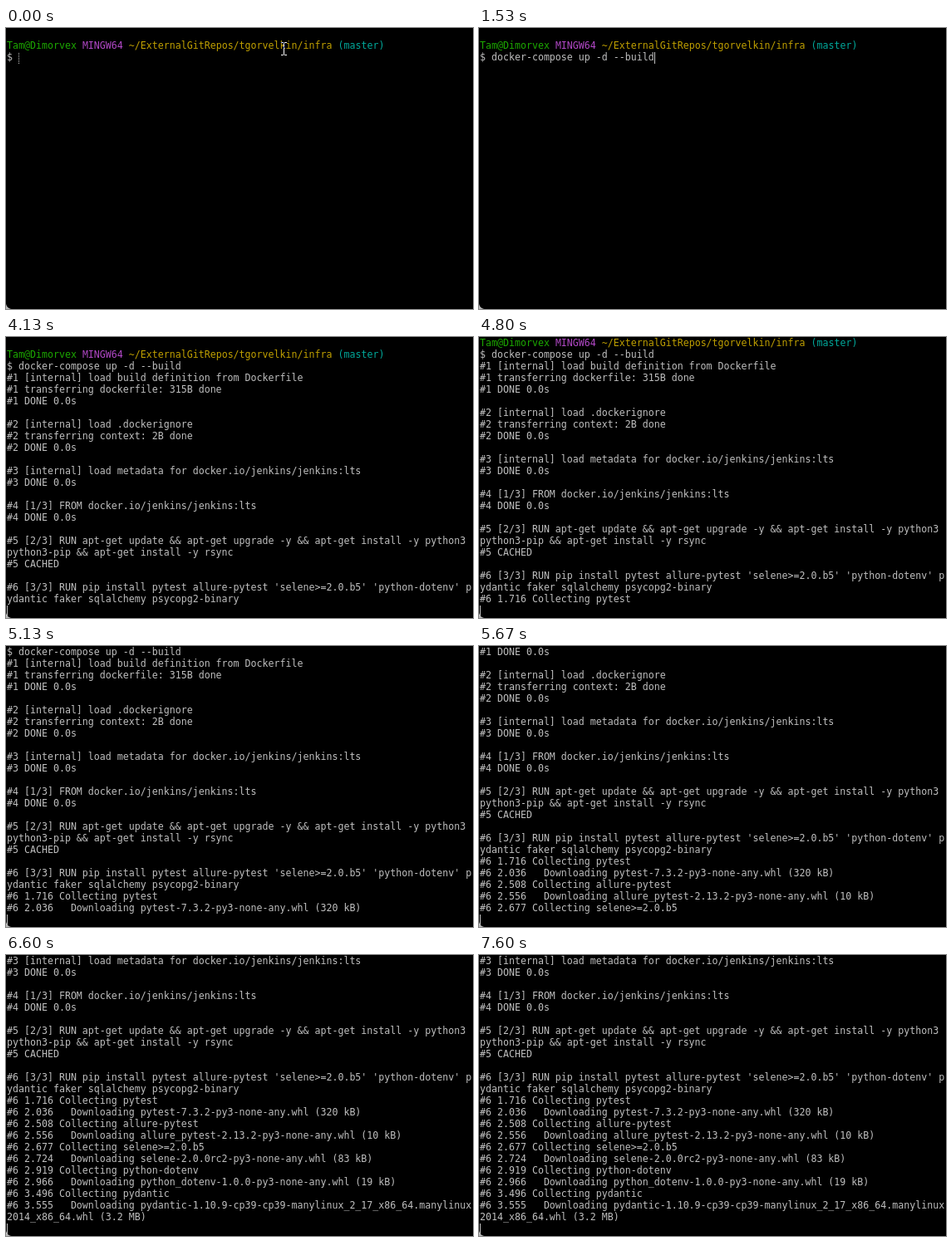
Recreate the animation shown at these times as an HTML page. Size 562 by 338 pixels, loop 8 s.

```html
<!DOCTYPE html>
<html lang="en">
<head>
<meta charset="utf-8">
<title>Terminal build</title>
<style>
  html, body { margin: 0; width: 100%; height: 100%; overflow: hidden; background: #000; }
  #stage { position: relative; width: 562px; height: 338px; overflow: hidden; background: #000; }
  #log {
    position: absolute; left: 1px; top: 0;
    color: #bfbfbf; font: 11.627px/14px "DejaVu Sans Mono", monospace;
    font-variant-ligatures: none; white-space: pre;
  }
  #log div { height: 14px; }
  .user { color: #1ca800; }
  .sys { color: #b148c6; }
  .path { color: #c0a000; }
  .branch { color: #00a89a; }
  #cursor { position: absolute; width: 1px; }
  #cursor.on { background: #bfbfbf; }
  #cursor.dots { background: repeating-linear-gradient(#000 0 1px, #bfbfbf 1px 2px); }
  #cursor.off { display: none; }
  #mouse { position: absolute; left: 331px; top: 17px; mix-blend-mode: difference; }
  #corner {
    position: absolute; left: 0; bottom: 0; width: 7px; height: 7px;
    background: radial-gradient(circle at 100% 0, transparent 6.5px, #b8b8b8 7.3px);
  }
</style>
</head>
<body>
<div id="stage">
  <div id="log"></div>
  <div id="cursor"></div>
  <svg id="mouse" width="7" height="16" shape-rendering="crispEdges">
    <path fill="#fff" d="M0 0h3v1h-3zM4 0h3v1h-3zM3 1h1v14h-1zM0 15h3v1h-3zM4 15h3v1h-3z"/>
  </svg>
  <div id="corner"></div>
</div>
<script>
const LOOP = 8000, COLS = 80, ROWS = 24, CELL_W = 7, CELL_H = 14;
const PROMPT = [
  ['user', 'Tam@Dimorvex'], ['sys', 'MINGW64'],
  ['path', '~/ExternalGitRepos/tgorvelkin/infra'], ['branch', '(master)'],
].map(([cls, text]) => `<span class="${cls}">${text}</span>`).join(' ');

const OUTPUT = `$ docker-compose up -d --build
#1 [internal] load build definition from Dockerfile
#1 transferring dockerfile: 315B done
#1 DONE 0.0s

#2 [internal] load .dockerignore
#2 transferring context: 2B done
#2 DONE 0.0s

#3 [internal] load metadata for docker.io/jenkins/jenkins:lts
#3 DONE 0.0s

#4 [1/3] FROM docker.io/jenkins/jenkins:lts
#4 DONE 0.0s

#5 [2/3] RUN apt-get update && apt-get upgrade -y && apt-get install -y python3 python3-pip && apt-get install -y rsync
#5 CACHED

#6 [3/3] RUN pip install pytest allure-pytest 'selene>=2.0.b5' 'python-dotenv' pydantic faker sqlalchemy psycopg2-binary
#6 1.716 Collecting pytest
#6 2.036   Downloading pytest-7.3.2-py3-none-any.whl (320 kB)
#6 2.508 Collecting allure-pytest
#6 2.556   Downloading allure_pytest-2.13.2-py3-none-any.whl (10 kB)
#6 2.677 Collecting selene>=2.0.b5
#6 2.724   Downloading selene-2.0.0rc2-py3-none-any.whl (83 kB)
#6 2.919 Collecting python-dotenv
#6 2.966   Downloading python_dotenv-1.0.0-py3-none-any.whl (19 kB)
#6 3.496 Collecting pydantic
#6 3.555   Downloading pydantic-1.10.9-cp39-cp39-manylinux_2_17_x86_64.manylinux2014_x86_64.whl (3.2 MB)`;

const wrap = line => line.match(new RegExp(`.{1,${COLS}}`, 'g')) || [''];
const lines = ['', '', ...OUTPUT.split('\n').flatMap(wrap)];

// time, cursor row, cursor column, cursor style
const STEPS = [
  [0, 2, 2, 'dots'], [600, 2, 2, 'off'], [1130, 2, 2, 'dots'], [1470, 2, 2, 'on'],
  [1530, 2, 30, 'on'], [2000, 2, 30, 'off'], [2270, 2, 30, 'on'],
  [2330, 3, 0, 'on'], [2800, 3, 0, 'off'], [2930, 6, 0, 'on'],
  [3070, 14, 6, 'off'], [3130, 23, 0, 'on'], [3600, 23, 0, 'off'],
  [4130, 23, 0, 'on'], [4670, 23, 0, 'off'], [4800, 24, 0, 'on'],
  [5130, 25, 0, 'on'], [5530, 27, 0, 'on'], [5670, 28, 0, 'on'],
  [5800, 29, 0, 'on'], [5930, 31, 0, 'on'], [6470, 31, 0, 'off'],
  [6530, 32, 0, 'on'], [6600, 34, 0, 'on'], [7070, 34, 0, 'off'], [7600, 34, 0, 'on'],
];

const [log, cursor, mouse] = ['log', 'cursor', 'mouse'].map(id => document.getElementById(id));
const screenRows = Array.from({ length: ROWS }, () => log.appendChild(document.createElement('div')));
let shown;

function draw([, row, col, style]) {
  const first = Math.max(0, row + 1 - ROWS);
  screenRows.forEach((el, i) => {
    const n = first + i;
    if (n === 1) el.innerHTML = PROMPT;
    else el.textContent = n < row ? lines[n] : n === row ? (lines[n] || '').slice(0, col) : '';
  });
  const top = 1 + (row - first) * CELL_H;
  cursor.className = style;
  cursor.style.left = 1 + col * CELL_W + 'px';
  cursor.style.top = top + 'px';
  cursor.style.height = Math.min(CELL_H, 336 - top) + 'px';
}

function tick() {
  const t = performance.now() % LOOP;
  const step = STEPS.findLast(s => s[0] <= t);
  if (step !== shown) draw(shown = step);
  mouse.style.display = t < 70 ? '' : 'none';
  requestAnimationFrame(tick);
}
tick();
</script>
</body>
</html>
```
